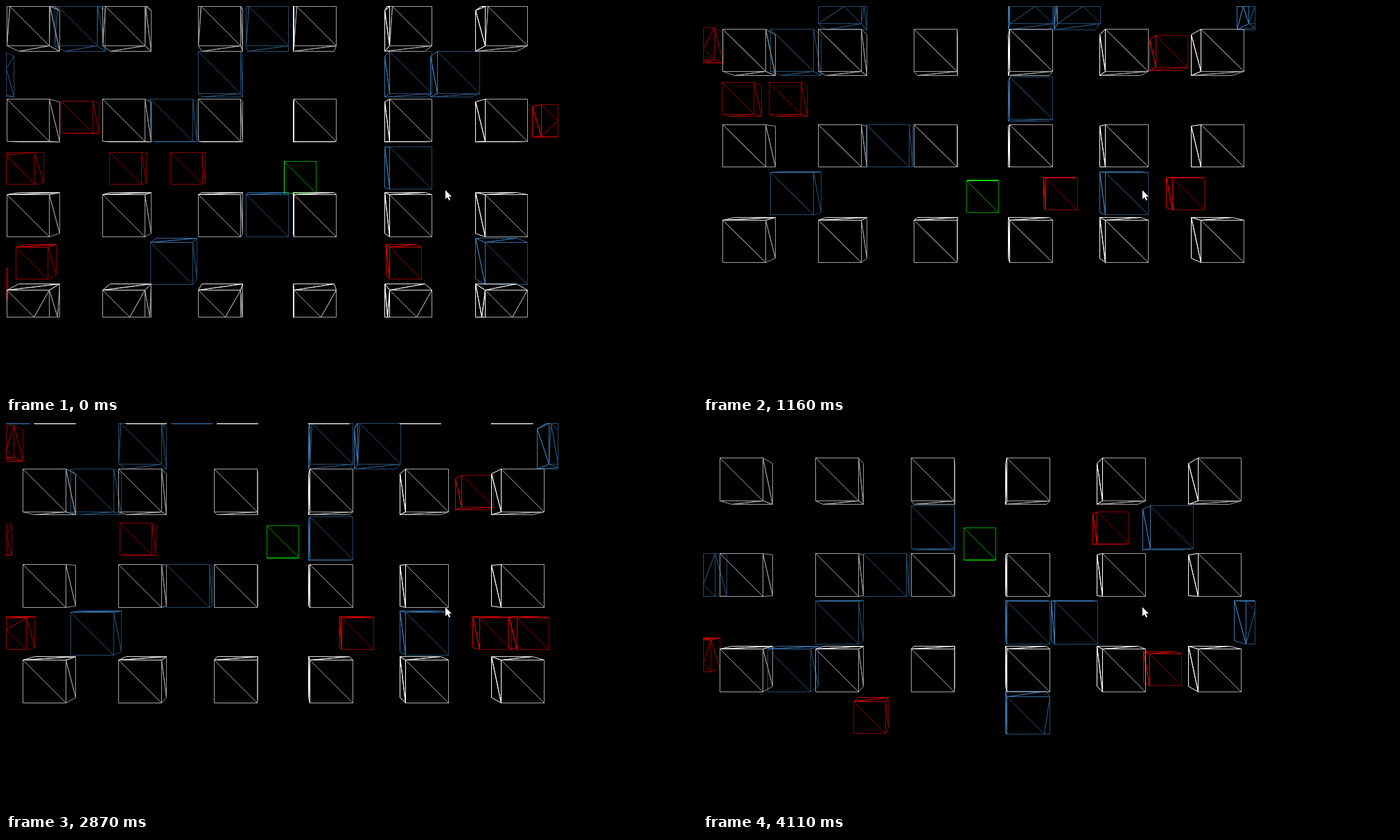
Write an HTML page with a canvas that moves like this. It is 997x562 px and loops after 4150 ms.

```html
<!DOCTYPE html>
<html>
<head>
<meta charset="utf-8">
<style>
  html, body { margin: 0; width: 100%; height: 100%; overflow: hidden; background: #000; }
  canvas { display: block; }
</style>
</head>
<body>
<canvas id="stage" width="997" height="562"></canvas>
<script>
const ctx = document.getElementById('stage').getContext('2d');
const LOOP = 4150, STEP = 41.5;
const W = 797, H = 450, CX = 399, CY = 225, DEPTH = 1316;
const CELL = 69, WALL = 61.6, MOVER = 46.3, FOLLOW = 0.0036;

const WHITE = [255, 255, 255], BLUE = [56, 118, 175], RED = [220, 0, 0], GREEN = [0, 245, 0];
const LIGHT = { front: 0.63, right: 0.58, bottom: 0.64, left: 1, top: 0.88 };

const colX = c => 24.5 + c * CELL;
const rowY = r => (r - 10) * CELL;
const lane = r => rowY(r) + 8;

// Breakable blocks: row -> columns
const blocks = { 3: [4, 9], 4: [-1, 3], 5: [-3, 2, 6, 7, 11], 6: [1], 7: [6], 8: [3], 9: [1, 8] };

// Piecewise linear path through [time, value] points
const path = (...keys) => t => {
  let i = 1;
  while (i < keys.length - 1 && t > keys[i][0]) i++;
  const [t0, v0] = keys[i - 1], [t1, v1] = keys[i];
  return v0 + (v1 - v0) * (t - t0) / (t1 - t0);
};
const still = v => () => v;
const patrol = t => {
  const u = (t - 405) / 473;
  return 642 + 21 * Math.abs(u - 2 * Math.round(u / 2));
};

const player = {
  x: path([0, 287], [450, 364.5], [500, 364.5], [560, 376], [LOOP, 376]),
  y: path([0, -186], [420, -186], [498, -180], [545, -180], [1162, -57], [1405, -8], [1944, -8],
    [2241, -69], [2864, -195], [3237, -273], [4067, -452], [LOOP, -452])
};

const enemies = [
  [still(-37), path([0, -273], [505, -251], [2740, -346], [LOOP, -287])],
  [still(-175), path([0, -24], [LOOP, 60])],
  [path([0, 540], [3400, 599], [LOOP, 567.5]), still(lane(3))],
  [patrol, still(lane(6))],
  [path([0, -121], [LOOP, -300]), still(lane(7))],
  [path([0, 33.5], [490, 12.5], [920, 31], [LOOP, -110]), still(lane(7))],
  [path([0, 122], [946, 80], [LOOP, 218]), still(lane(7))],
  [path([0, -102], [480, -123], [LOOP, 37]), still(lane(9))],
  [path([0, 440], [1950, 525], [LOOP, 429]), still(lane(9))],
  [path([0, 725], [1900, 643], [2890, 686], [LOOP, 631]), still(lane(9))],
  [path([0, 864], [2920, 737], [LOOP, 790]), still(lane(9))]
];

// The camera eases towards the player
function cameraAt(t) {
  let x = 284.5, y = -185;
  for (let s = 0; s < t; s += 5) {
    const dt = Math.min(5, t - s);
    x += (player.x(s) + 23 - x) * FOLLOW * dt;
    y += (player.y(s) + 23 - y) * FOLLOW * dt;
  }
  return { x, y };
}

function clip(poly, axis, limit, sign) {
  const out = [];
  poly.forEach((cur, i) => {
    const prev = poly[(i || poly.length) - 1];
    const a = (limit - prev[axis]) * sign, b = (limit - cur[axis]) * sign;
    if ((a >= 0) !== (b >= 0)) {
      const k = a / (a - b);
      out.push([0, 1].map(n => prev[n] + (cur[n] - prev[n]) * k));
    }
    if (b >= 0) out.push(cur);
  });
  return out;
}

// Clips a triangle to the view's pixel centres and outlines the resulting fan
function triangle(...poly) {
  for (const [axis, size] of [[0, W], [1, H]])
    poly = clip(clip(poly, axis, 0.5, -1), axis, size - 0.5, 1);
  poly = poly.map(p => p.map(v => Math.floor(v) + 0.5));
  for (let i = 1; i < poly.length - 1; i++) {
    ctx.moveTo(...poly[0]);
    ctx.lineTo(...poly[i]);
    ctx.lineTo(...poly[i + 1]);
    ctx.closePath();
  }
}

function face(color, light, a, b, c, d) {
  ctx.strokeStyle = `rgb(${color.map(v => Math.round(v * light))})`;
  ctx.beginPath();
  triangle(a, b, c);
  triangle(c, d, a);
  ctx.stroke();
}

function cube(cam, x, y, size, z, color) {
  const corners = depth => {
    const s = DEPTH / (DEPTH + depth);
    const l = CX + (x - cam.x) * s, t = CY + (y - cam.y) * s, w = size * s;
    return [[l, t], [l + w, t], [l + w, t + w], [l, t + w]];
  };
  const f = corners(z), b = corners(z + size);
  face(color, LIGHT.front, ...f);
  if (f[1][0] < CX) face(color, LIGHT.right, f[1], b[1], b[2], f[2]);
  if (f[2][1] < CY) face(color, LIGHT.bottom, b[3], f[3], f[2], b[2]);
  if (f[0][0] > CX) face(color, LIGHT.left, b[0], f[0], f[3], b[3]);
  if (f[0][1] > CY) face(color, LIGHT.top, f[0], b[0], b[1], f[1]);
}

function pointer() {
  const shape = [[0, 0], [0, 13], [3, 10.3], [5.3, 15], [7.2, 14], [5, 9.6], [9, 9.3]];
  ctx.beginPath();
  shape.forEach(([x, y]) => ctx.lineTo(634 + x, 266 + y));
  ctx.closePath();
  ctx.strokeStyle = '#000';
  ctx.stroke();
  ctx.fillStyle = '#fff';
  ctx.fill();
}

function draw(t) {
  const cam = cameraAt(t);
  ctx.globalCompositeOperation = 'source-over';
  ctx.fillStyle = '#000';
  ctx.fillRect(0, 0, 997, 562);
  ctx.lineWidth = 1;
  ctx.globalCompositeOperation = 'lighten';
  for (let r = 2; r <= 10; r += 2)
    for (let c = -2; c <= 10; c += 2) cube(cam, colX(c), rowY(r), WALL, 0, WHITE);
  for (const r in blocks)
    for (const c of blocks[r]) cube(cam, colX(c), rowY(r), WALL, 0, BLUE);
  for (const [x, y] of enemies) cube(cam, x(t), y(t), MOVER, 8, RED);
  cube(cam, player.x(t), player.y(t), MOVER, 8, GREEN);
  ctx.globalCompositeOperation = 'source-over';
  pointer();
}

const start = performance.now();
function tick() {
  const t = (performance.now() - start) % LOOP;
  draw(Math.min(99, Math.floor((t + 5) / STEP)) * STEP);
  requestAnimationFrame(tick);
}
tick();
</script>
</body>
</html>
```
